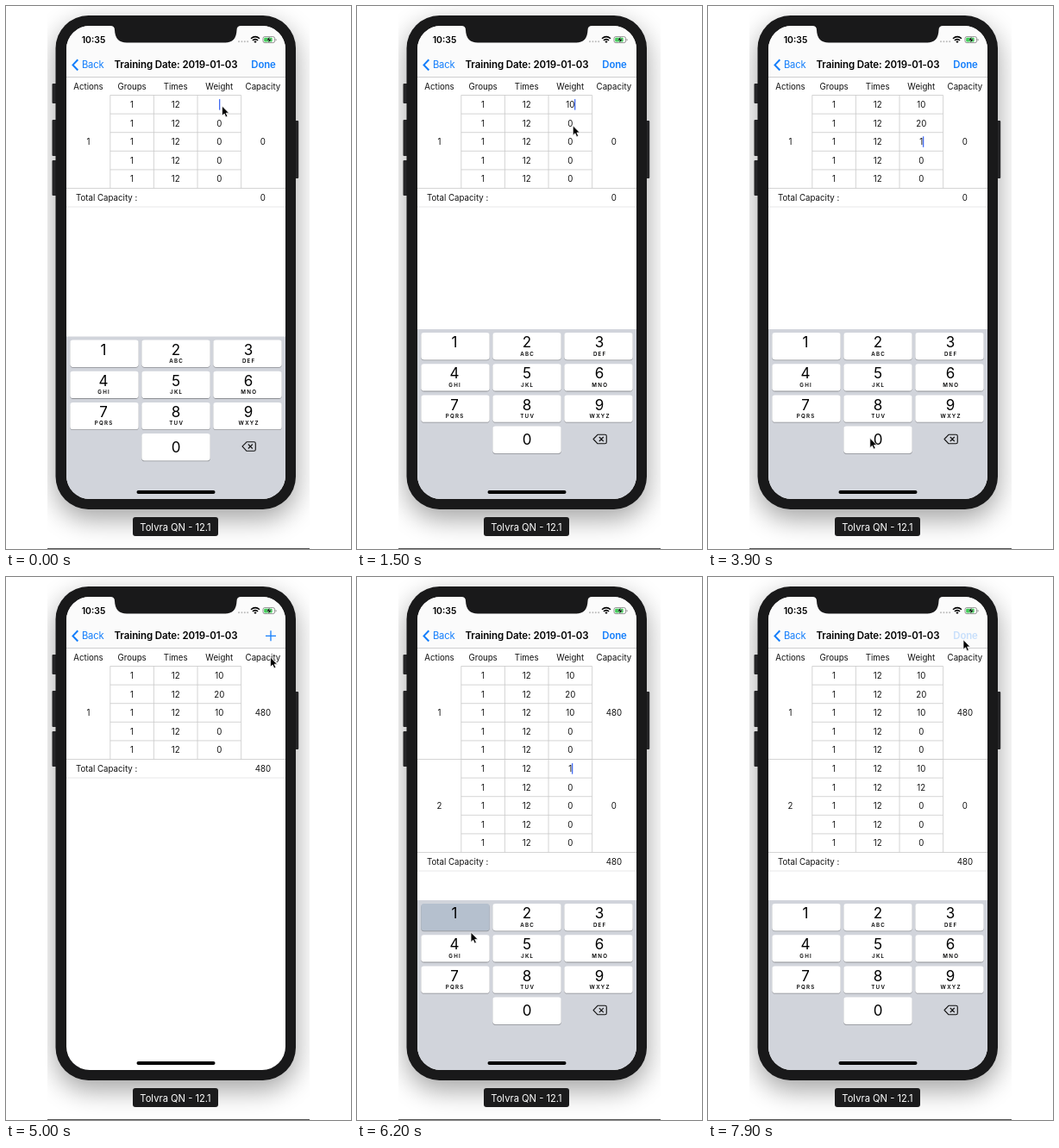
These frames come from a looping animation (400x630 px, 8 s). An HTML page:

```html
<!DOCTYPE html>
<html lang="en">
<head>
<meta charset="utf-8">
<title>Training log</title>
<style>
  html, body { margin: 0; width: 100%; height: 100%; overflow: hidden; background: #fff; }
  svg { display: block; width: 400px; height: 630px; }
  text { font: 400 9.7px Inter, Roboto, "Liberation Sans", sans-serif; fill: #111; text-anchor: middle; }
  .left { text-anchor: start; }
  .title { font-size: 11.5px; font-weight: 600; letter-spacing: -.1px; fill: #000; }
  .clock { font-size: 10.4px; font-weight: 600; fill: #000; }
  .link { font-size: 11.2px; fill: #147efb; letter-spacing: -.2px; }
  .done { font-size: 11.4px; font-weight: 600; letter-spacing: -.1px; }
  .digit { font-size: 17px; fill: #000; }
  .letters { font-size: 6.2px; font-weight: 600; letter-spacing: 1.25px; fill: #000; }
  .label { font-size: 11.2px; fill: #fff; }
</style>
</head>
<body>
<svg id="stage" viewBox="0 0 400 630">
  <defs>
    <clipPath id="halo"><rect x="48" width="304" height="630"/></clipPath>
    <clipPath id="screen"><rect x="70" y="23" width="254" height="549" rx="27"/></clipPath>
    <filter id="blur" x="-30%" y="-20%" width="160%" height="140%"><feGaussianBlur stdDeviation="15"/></filter>
  </defs>
  <rect width="400" height="630" fill="#fff"/>
  <g clip-path="url(#halo)">
    <rect x="57" y="21" width="280" height="575" rx="40" opacity=".35" filter="url(#blur)"/>
  </g>
  <rect x="48" y="629" width="304" height="1" fill="#555"/>
  <g fill="#252527">
    <rect x="53.5" y="90" width="6" height="23" rx="1"/>
    <rect x="53.5" y="132" width="6" height="42" rx="1"/>
    <rect x="53.5" y="179" width="6" height="41" rx="1"/>
    <rect x="334" y="133" width="5.2" height="67" rx="1"/>
  </g>
  <rect x="57.5" y="11" width="278.5" height="573" rx="38" fill="#19191a"/>
  <g clip-path="url(#screen)">
    <rect x="70" y="23" width="254" height="549" fill="#fff"/>
    <rect x="70" y="23" width="254" height="59.5" fill="#fbfbfb"/>
    <rect x="70" y="82" width="254" height=".8" fill="#c4c4c6"/>
    <path d="M121 22V23Q126 23 126 28Q126.5 42.500 140 42.500H254Q267 42.500 267.5 28Q267.5 23 272.5 23V22Z" fill="#19191a"/>
    <g id="table"></g>
    <g id="keyboard"></g>
    <rect x="151.5" y="562" width="91" height="4" rx="2"/>
  </g>
  <text class="clock" x="101.5" y="43">10:35</text>
  <path d="M270 41.300H281" stroke="#bbb" stroke-width="2" stroke-linecap="round" stroke-dasharray="0 3.400"/>
  <g fill="none" stroke="#000" stroke-width="1.5">
    <path d="M284 37.700Q289 33.500 294 37.700M285.900 39.900Q289 37.300 292.100 39.900"/>
    <path d="M287.400 41.200L289 43L290.600 41.200Q289 40 287.400 41.200Z" fill="#000" stroke="none"/>
  </g>
  <rect x="298" y="35.600" width="13.600" height="7" rx="2" fill="#fff" stroke="#777" stroke-width=".8"/>
  <rect x="299.200" y="36.800" width="9.500" height="4.600" rx="1" fill="#3fce57"/>
  <path d="M305.800 35.500L302 39.700H304.700L303.900 43L307.900 38.600H305.200Z" fill="#000" stroke="#fff" stroke-width=".3"/>
  <path d="M312.600 38v2.400q1-.4 1-1.200t-1-1.200" fill="#777"/>
  <path d="M83.300 62.300L77.500 68.400L83.300 74.500" fill="none" stroke="#147efb" stroke-width="2"/>
  <text class="link left" x="88" y="72.300">Back</text>
  <text class="title" x="197" y="72.300">Training Date: 2019-01-03</text>
  <text id="done" class="link done" x="298.5" y="72.300">Done</text>
  <path id="plus" d="M301 68.300H313M307 62.300V74.300" stroke="#147efb" stroke-width="1.3"/>
  <rect x="147" y="593" width="99" height="22" rx="3" fill="#1b1b1c"/>
  <text class="label" x="196.5" y="608.500">Tolvra QN - 12.1</text>
  <g id="cursor">
    <path transform="scale(.84)" d="M0 0V13.500L3.100 10.600L5.200 15.300L7.600 14.200L5.500 9.700H9.600Z" stroke="#fff" stroke-width=".9"/>
  </g>
</svg>
<script>
const LOOP = 8000, STEP = 100, SETS = 5, REPS = 12;
const ROW = 21.6, TOP = 103.5, COL = 50.6, KEY_ROW = 36.2;
const colX = i => 95.5 + i * COL;
const $ = id => document.getElementById(id);

function add(parent, name, attrs, text) {
  const node = document.createElementNS('http://www.w3.org/2000/svg', name);
  for (const k in attrs) node.setAttribute(k, attrs[k]);
  if (text !== undefined) node.textContent = text;
  parent.append(node);
  return node;
}
const label = (parent, x, y, text, cls = '') => add(parent, 'text', { x, y, class: cls }, text);
const line = (parent, x1, y1, x2, y2, stroke = '#c9c9c9') =>
  add(parent, 'line', { x1, y1, x2, y2, stroke, 'stroke-width': .8 });
const show = (node, on) => node.setAttribute('visibility', on ? 'visible' : 'hidden');
const move = (node, x, y) => node.setAttribute('transform', `translate(${x} ${y})`);

// Table: two blocks of sets, then the total line
const table = $('table'), weights = [], capacities = [];
['Actions', 'Groups', 'Times', 'Weight', 'Capacity'].forEach((s, i) => label(table, colX(i), 97.2, s));

function block(n) {
  const g = add(table, 'g', {}), y0 = TOP + n * SETS * ROW, y1 = y0 + SETS * ROW;
  for (let r = 0; r < SETS; r++) {
    const y = y0 + r * ROW, base = y + 14.4;
    line(g, colX(.5), y, colX(3.5), y);
    label(g, colX(1), base, 1);
    label(g, colX(2), base, REPS);
    weights.push(label(g, colX(3), base, 0));
  }
  for (let i = .5; i < 4; i++) line(g, colX(i), y0, colX(i), y1);
  line(g, 70, y1, 324, y1);
  label(g, colX(0), y0 + 57.4, n + 1);
  capacities.push(label(g, colX(4), y0 + 57.4, 0));
  return g;
}
block(0);
const second = block(1);
const totalRow = add(table, 'g', {});
label(totalRow, 81, 226, 'Total Capacity :', 'left');
const total = label(totalRow, colX(4), 226, 0);
line(totalRow, 70, 233, 324, 233, '#e2e2e4');
const caret = add(table, 'rect', { width: 1.3, height: 12.5, fill: '#426bf2' });

// Number pad
const pad = $('keyboard'), keys = {};
add(pad, 'rect', { x: 70, y: 375, width: 254, height: 200, fill: '#d1d4db' });
function key(digit, col, row, sub) {
  const mid = 113 + col * 84, y = 379 + row * KEY_ROW;
  const box = { x: 74.3 + col * 83, width: 79.4, height: 31.4, rx: 3.4 };
  add(pad, 'rect', { ...box, y: y + .8, fill: '#8d8f94' });
  keys[digit] = add(pad, 'rect', { ...box, y, fill: '#fff' });
  label(pad, mid, y + (row < 3 ? 17.2 : 21.8), digit, 'digit');
  if (sub) label(pad, mid + .7, y + 26.6, sub, 'letters');
}
['', 'ABC', 'DEF', 'GHI', 'JKL', 'MNO', 'PQRS', 'TUV', 'WXYZ']
  .forEach((s, i) => key(i + 1, i % 3, i / 3 | 0, s));
key(0, 1, 3);
add(pad, 'path', {
  d: 'M279 497.300H287.500Q289.300 497.300 289.300 499V506Q289.300 507.800 287.500 507.800H279L274 502.500ZM280.800 500L285.800 505M285.800 500L280.800 505',
  fill: 'none', stroke: '#111', 'stroke-width': 1.1, 'stroke-linejoin': 'round'
});

// Where the pointer goes for each kind of action
const place = {
  row: r => [250.5, TOP + (r + .58) * ROW],
  key: d => {
    const i = d ? d - 1 : 10;
    return [120 + 68 * (i % 3), 393 + KEY_ROW * (i / 3 | 0)];
  },
  done: () => [296, 72.8],
  add: () => [306.5, 70],
  rest: () => [306.5, 93]
};
const act = (time, kind, arg) => ({ time, kind, arg, at: place[kind](arg) });
const enter = (time, row, digits, gap) => [
  act(time, 'row', row),
  ...[...digits].map((d, i) => act(time + gap * (i + 1), 'key', +d))
];
const script = [
  ...enter(0, 0, '10', 550),
  ...enter(1600, 1, '20', 400),
  ...enter(3000, 2, '10', 500),
  act(4600, 'done'), act(5000, 'rest'), act(5300, 'add'),
  ...enter(5600, 5, '10', 500),
  ...enter(7000, 6, '12', 250),
  act(7900, 'done')
];

function stateAt(t) {
  const s = {
    values: Array(2 * SETS).fill('0'), caps: [0, 0], focus: 0, blocks: 1,
    lit: -1, pressed: false, padUp: true, padSince: -250
  };
  for (const { time, kind, arg } of script) {
    const age = t - time;
    if (age < 0) break;
    if (kind === 'row') {
      if (!s.padUp) Object.assign(s, { padUp: true, padSince: time });
      s.focus = arg;
      s.values[arg] = '';
    }
    if (kind === 'key') {
      s.values[s.focus] += arg;
      if (age < 150) s.lit = arg;
    }
    if (kind === 'add') s.blocks = 2;
    if (kind === 'done') {
      s.pressed = age < STEP;
      if (s.pressed) continue;
      Object.assign(s, { focus: -1, padUp: false, padSince: time + STEP });
      s.caps = [0, SETS].map(i => REPS * s.values.slice(i, i + SETS).reduce((sum, v) => sum + +v, 0));
    }
  }
  return s;
}

// Critically damped slide of the pad
function padOffset(t, { padUp, padSince }) {
  const x = (t - padSince) / 50, left = (1 + x) * Math.exp(-x);
  return 210 * (padUp ? left : 1 - left);
}

// The pointer lingers after each action, then eases out towards the next
function pointer(t) {
  const i = script.findIndex(a => a.time > t);
  if (i < 0) return script[script.length - 1].at;
  const from = script[i - 1], to = script[i], leave = from.time + 80;
  const p = Math.max(0, (t - leave) / (to.time - leave));
  const k = 1 - (1 - p) ** 4;
  return from.at.map((v, j) => v + (to.at[j] - v) * k);
}

function draw(t) {
  const s = stateAt(t), editing = s.focus >= 0;
  weights.forEach((w, i) => w.textContent = s.values[i]);
  capacities.forEach((c, i) => c.textContent = s.caps[i]);
  total.textContent = s.caps[0] + s.caps[1];
  show(second, s.blocks > 1);
  move(totalRow, 0, (s.blocks - 1) * SETS * ROW);

  show(caret, editing && !s.pressed);
  if (editing) {
    const half = s.values[s.focus] ? weights[s.focus].getComputedTextLength() / 2 : 0;
    caret.setAttribute('x', colX(3) + half - .3);
    caret.setAttribute('y', TOP + s.focus * ROW + 4.6);
  }
  for (const d in keys) keys[d].setAttribute('fill', +d === s.lit ? '#b5c0ce' : '#fff');
  show($('done'), editing);
  $('done').setAttribute('opacity', s.pressed ? .22 : 1);
  show($('plus'), !editing);
  move(pad, 0, padOffset(t, s));
  move($('cursor'), ...pointer(t));
}

const start = performance.now();
let last = -1;
function tick() {
  const t = Math.floor((performance.now() - start) % LOOP / STEP) * STEP;
  if (t !== last) draw(last = t);
  requestAnimationFrame(tick);
}
tick();
</script>
</body>
</html>
```
